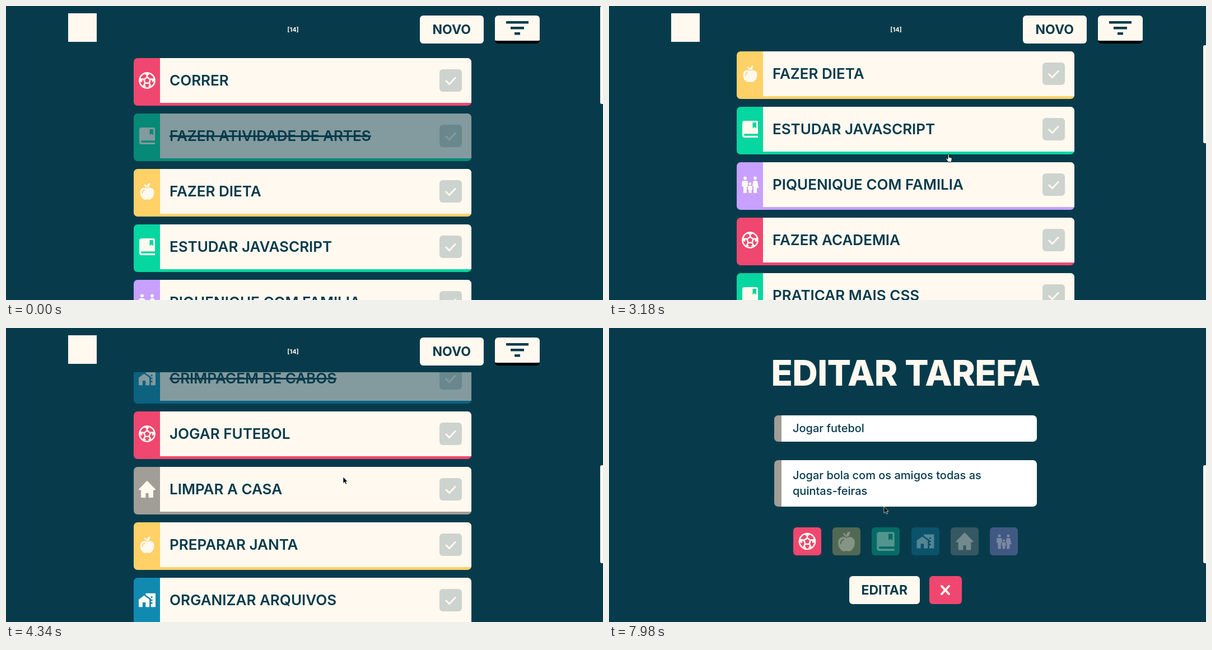
An HTML page that plays this animation: 1066x525 px, repeating every 8 s.

```html
<!DOCTYPE html>
<html lang="pt">
<head>
<meta charset="utf-8">
<title>To-Do</title>
<style>
:root { --bg: #073b4c; --cream: #fff9ef; }
html, body { margin: 0; width: 100%; height: 100%; overflow: hidden; }
body { position: relative; background: var(--bg); color: var(--bg); font-family: Inter, "Open Sans", sans-serif; }
body * { box-sizing: border-box; }
.abs, .card, .card > *, .icon, header > *, #modal > * { position: absolute; }
svg { display: block; overflow: visible; fill: var(--cream); }

.card { left: 228px; width: 602.5px; border-radius: 7px; overflow: hidden; background: var(--c); }
.done { opacity: .5; }
.done .title { text-decoration: line-through; text-decoration-thickness: 3px; }
.title { left: 47px; right: 0; top: 0; height: 80px; padding-left: 17px; background: var(--cream); font: 600 26px/80px Inter, "Open Sans", sans-serif; white-space: nowrap; }
.box { left: 546px; top: 20px; width: 40px; height: 40px; border-radius: 6px; background: #cdd3ce; }
.text { left: 64px; top: 119px; font: 600 17px/22px Inter, "Open Sans", sans-serif; color: var(--cream); white-space: nowrap; }
.icon { transform: translate(-50%, -50%); }

header { position: absolute; inset: 0 0 auto; height: 79px; background: var(--bg); }
.btn { border-radius: 6px; background: var(--cream); text-align: center; font: 700 23px/50px Inter, "Open Sans", sans-serif; height: 50px; }
#mark { left: 111px; top: 13px; width: 51px; height: 51px; background: var(--cream); }
#count { left: 482px; width: 61px; top: 34px; text-align: center; font: 700 11px/17px Inter, sans-serif; color: var(--cream); }

#modal { left: 0; width: 1066px; height: 526px; background: var(--bg); }
h1 { left: 0; width: 1059px; top: 40px; margin: 0; text-align: center; color: var(--cream); font: 800 63px/80px Inter, "Open Sans", sans-serif; letter-spacing: -.01em; }
.field { left: 295px; width: 468.5px; padding-left: 20px; border-left: 13.5px solid #a19d97; border-radius: 7px; background: #fff; font: 500 20px/28px Inter, "Open Sans", sans-serif; }
.pick { --c: color-mix(in srgb, var(--kind) 30%, var(--bg)); top: 356px; width: 50px; height: 50px; border-radius: 6px; background: var(--c); }
.pick .icon { opacity: .3; }
.pick.on { --c: var(--kind); }
.pick.on .icon { opacity: 1; }
#thumb { right: 0; width: 5px; border-radius: 3px 0 0 3px; background: var(--cream); }
#cursor { left: 0; top: 0; }
</style>
</head>
<body>
<svg width="0" height="0" class="abs">
  <g id="ball" fill="none" stroke="#fff9ef" stroke-width="2.6" stroke-linejoin="round">
    <circle cx="16" cy="16" r="13.6"/>
    <path d="M16 10.2l5.6 4-2.1 6.6h-7l-2.1-6.6z"/>
    <path d="M16 10.2V7M21.6 14.2l3.4-1M19.5 20.8l2 2.9M12.5 20.8l-2 2.9M10.4 14.2l-3.4-1"/>
    <path d="M12 4l4 3 4-3zM28.5 12l-3.5 1.2.3 5 3-1zM23.5 26l-2-2.3-3 3.3zM8.5 26l2-2.3 3 3.3zM3.5 12l3.5 1.2-.3 5-3-1z" stroke-width="1.2" fill="#fff9ef"/>
  </g>
  <g id="apple">
    <path d="M16 11C13 8.5 3.5 8 3.5 18c0 7 5 13 9 13 2 0 2.5-1 3.5-1s1.5 1 3.5 1c4 0 9-6 9-13C28.5 8 19 8.5 16 11zM15.5 9.5C15 5 17 2 21.5 1c0 5-2 8-6 8.5z"/>
    <path d="M14.5 9Q14 5.5 11 4" fill="none" stroke="#fff9ef" stroke-width="2"/>
    <path d="M7.5 19q0-4.5 4-5.5" fill="none" stroke="var(--c)" stroke-width="1.8" stroke-linecap="round"/>
  </g>
  <g id="book">
    <path d="M6 1h21q3 0 3 3v27H6q-4 0-4-4V5q0-4 4-4z"/>
    <path d="M30 24.3H7q-2 0-2 1.7t2 1.7h23zM20.5 4H27v10.5l-3.25-2.5-3.25 2.5z" fill="var(--c)"/>
  </g>
  <path id="work" transform="translate(16 16) scale(1.36) translate(-12 -12)" d="M1 11v10h5v-6h4v6h5V11L8 6zM10 3v1.97l7 5V11h2v2h-2v2h2v2h-2v4h6V3zm9 6h-2V7h2z"/>
  <path id="house" d="M16 2L30 16.5h-4V30h-6.5v-8h-7v8H6V16.5H2z" stroke="#fff9ef" stroke-width="2" stroke-linejoin="round"/>
  <g id="family">
    <circle cx="7" cy="4.5" r="2.9"/><circle cx="25" cy="4.5" r="2.9"/><circle cx="16" cy="14.5" r="2.4"/>
    <path d="M4 9h6q2 0 2 2v8.5h-2V31H4V19.5H1.5v-8Q1.500 9 4 9zM23 9h4q1.5 0 2 1.5L31.5 22H28v9h-6V19l-2-1 1.3-7Q21.7 9 23 9zM14 18h4q2 0 2 2v5h-1.5v6h-5v-6H12v-5q0-2 2-2z"/>
  </g>
</svg>

<div id="list"></div>

<header>
  <div id="mark"></div>
  <div id="count">[14]</div>
  <div class="btn" style="left:739px;top:17px;width:113.5px">NOVO</div>
  <div class="btn" style="left:873px;top:17px;width:80px;border-bottom:5px solid #000">
    <svg width="80" height="45" style="fill:var(--bg)"><path d="M20 10h40v4.500H20zM28 20h24v4.500H28zM35 30h10v4.500H35z"/></svg>
  </div>
</header>

<div id="modal" class="abs">
  <h1>EDITAR TAREFA</h1>
  <div class="field" style="top:156px;height:46.5px;padding-top:9px">Jogar futebol</div>
  <div class="field" style="top:236px;height:83px;padding-top:13px">Jogar bola com os amigos todas as<br>quintas-feiras</div>
  <div class="btn" style="left:429px;top:443px;width:125.5px">EDITAR</div>
  <div class="btn" style="left:572px;top:443px;width:58px;background:#ef476f">
    <svg width="58" height="50"><path d="M22 18l13 14M35 18L22 32" stroke="#fff9ef" stroke-width="4" stroke-linecap="round"/></svg>
  </div>
</div>

<div id="thumb" class="abs"></div>

<svg id="cursor" class="abs" width="16" height="18">
  <path id="arrow" d="M0 0v11.5l2.7-2.4 1.9 4 2-.9-1.9-3.9H8z" fill="#000" stroke="#fff" stroke-width=".7"/>
  <path id="hand" d="M3 6.5v-7q0-1.200 1.100-1.200T5.200-.5V4l3.300.7q1.900.4 1.800 2.200l-.6 3.600-.9 2.200H3.700L0 7.500q-.5-1.200.7-1.500Q1.700 6 3 7.500z" fill="#fff" stroke="#000" stroke-width=".9" stroke-linejoin="round"/>
</svg>

<script>
const $ = id => document.getElementById(id);
const colors = { ball: '#ef476f', apple: '#ffd166', book: '#06d6a0', work: '#118ab2', house: '#a19d97', family: '#c8a0ff' };
const pickSize = { ball: 33, apple: 38, book: 36, work: 33, house: 33, family: 28 };
const tasks = [
  ['ball', 'CORRER'], ['book', 'FAZER ATIVIDADE DE ARTES', 'done'], ['apple', 'FAZER DIETA'],
  ['book', 'ESTUDAR JAVASCRIPT'], ['family', 'PIQUENIQUE COM FAMILIA'], ['ball', 'FAZER ACADEMIA'],
  ['book', 'PRATICAR MAIS CSS'], ['work', 'CRIMPAGEM DE CABOS', 'done'], ['ball', 'JOGAR FUTEBOL'],
  ['house', 'LIMPAR A CASA'], ['apple', 'PREPARAR JANTA'], ['work', 'ORGANIZAR ARQUIVOS']
];
const OPEN = 8, PITCH = 99, CARD = 85.5, GROW = 98, PAGE = 1577;

const icon = (name, x, y, size) =>
  `<svg class="icon" style="left:${x}px;top:${y}px" width="${size}" height="${size}" viewBox="0 0 32 32"><use href="#${name}"/></svg>`;

const details = `<div class="text">Jogar bola com os amigos todas as quintas-feiras</div>
  <svg style="left:557px;top:97px" width="18" height="18"><path d="M0 18l1-5.5 8.7-8.7 4.5 4.5L5.5 17zM10.8 2.7L12.5 1q1.2-1.2 2.4 0L17 3.1q1.2 1.2 0 2.4l-1.7 1.7z"/></svg>
  <svg style="left:556px;top:135px" width="20" height="23"><path d="M0 2.5h6l1-2h6l1 2h6v3H0zM1.5 7h17l-1 14q-.2 2-2 2h-11q-1.8 0-2-2z"/><path d="M6.3 9.5V20M10 9.5V20M13.7 9.5V20" stroke="var(--c)" stroke-width="1.5"/></svg>`;

$('list').innerHTML = tasks.map(([kind, name, state = ''], i) =>
  `<div class="card ${state}" style="--c:${colors[kind]}">
    ${icon(kind, 23.5, 40, 32)}
    <div class="title">${name}</div>
    <div class="box"><svg width="40" height="40"><path d="M11 20l6.5 6.5L29 14.5" fill="none" stroke="#fff9ef" stroke-width="3"/></svg></div>
    ${i === OPEN ? details : ''}
  </div>`).join('');
const cards = [...$('list').children];

$('modal').insertAdjacentHTML('beforeend', Object.keys(colors).map((kind, i) =>
  `<div class="pick ${i ? '' : 'on'}" style="--kind:${colors[kind]};left:${329 + i * 70.2}px">${icon(kind, 25, 25, pickSize[kind])}</div>`).join(''));

const part = (t, start, length) => Math.min(1, Math.max(0, (t - start) / length));
const smooth = p => p * p * (3 - 2 * p);

// The CSS "ease" curve, cubic-bezier(.25, .1, .25, 1)
function ease(x) {
  const curve = (a, b, s) => 3 * a * s * (1 - s) ** 2 + 3 * b * s * s * (1 - s) + s ** 3;
  let lo = 0, hi = 1;
  for (let i = 0; i < 20; i++) {
    const mid = (lo + hi) / 2;
    if (curve(.25, .25, mid) < x) lo = mid; else hi = mid;
  }
  return curve(.1, 1, hi);
}

// Start times of the mouse wheel notches
const notches = [2065, 2635, 2850, 3135, 3260, 3690, 3790, 3880, 3970, 4060, 4140];
const scrollAt = t => notches.reduce((sum, start) => sum + 66.9 * smooth(part(t, start, 200)), 0);

// Pointer moves: start, end, x, y
const moves = [
  [250, 790, 602, 266], [4500, 5010, 515, 199], [5300, 5970, 416, 290],
  [6000, 6840, 797, 261], [7380, 7970, 491, 319]
];
function pointerAt(t) {
  let x = 975, y = 505;
  for (const [start, end, toX, toY] of moves) {
    const p = smooth(part(t, start, end - start));
    x += (toX - x) * p;
    y += (toY - y) * p;
  }
  return [x, y];
}
const handTimes = [[560, 4200], [4620, 5480], [6760, 7380]];

function draw(t) {
  const scroll = scrollAt(t);
  const grow = GROW * (ease(part(t, 5180, 500)) - ease(part(t, 7240, 400)));
  cards.forEach((card, i) => {
    card.style.top = 92.5 + i * PITCH - scroll + (i > OPEN ? grow : 0) + 'px';
    card.style.height = CARD + (i === OPEN ? grow : 0) + 'px';
  });

  const ratio = 525 / (PAGE + grow);
  $('thumb').style.top = scroll * ratio + 'px';
  $('thumb').style.height = 525 * ratio + 'px';
  $('modal').style.top = 526 * (ease(part(t, 7201, 500)) - 1) + 'px';

  const [x, y] = pointerAt(t);
  const hand = handTimes.some(([from, to]) => t >= from && t < to);
  $('cursor').style.transform = `translate(${x}px, ${y}px)`;
  $('cursor').style.visibility = t < 250 ? 'hidden' : 'visible';
  $('hand').style.display = hand ? '' : 'none';
  $('arrow').style.display = hand ? 'none' : '';
}

const begin = performance.now();
function tick() {
  draw((performance.now() - begin) % 8000);
  requestAnimationFrame(tick);
}
tick();
</script>
</body>
</html>
```
